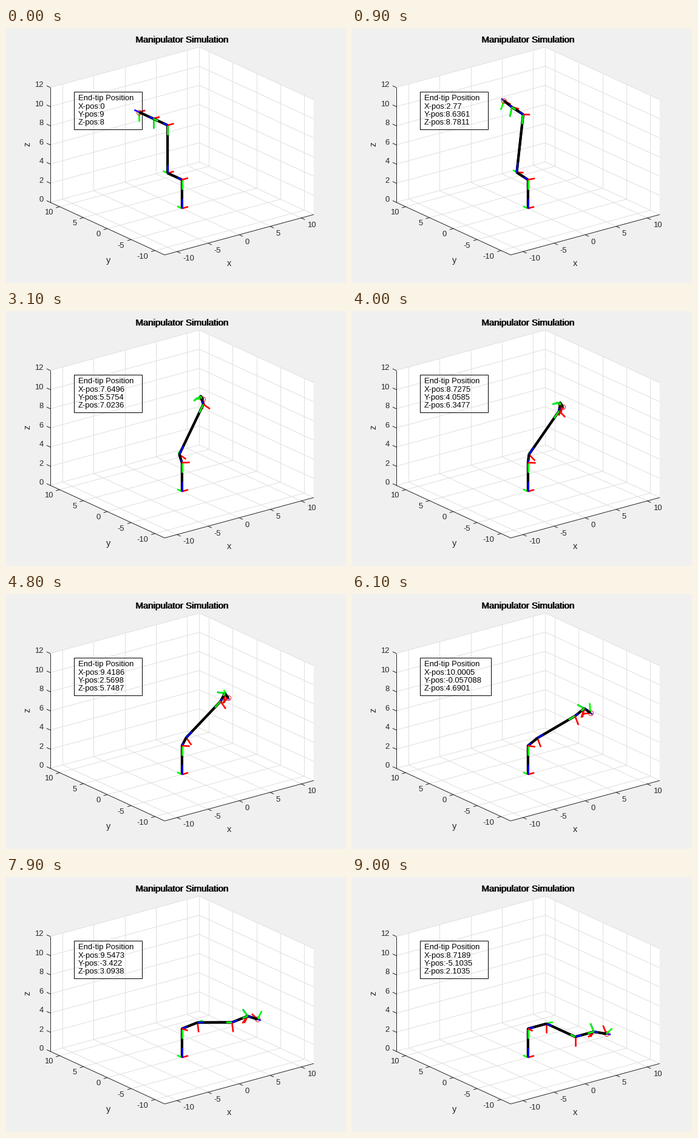
Recreate the animation shown at these times as a matplotlib script. Size 560 px wide and 420 px high, loop 9.1 s.

```python
import numpy as np
import matplotlib.pyplot as plt
from matplotlib.animation import FuncAnimation
from matplotlib.patches import Polygon, Rectangle

W, H, DPI = 560, 420, 100
FRAMES, INTERVAL = 91, 100
LIM, TOP = 12, 12
INK, GRID = "#262626", "#dfdfdf"

# Orthographic view: pixel steps per unit of x, y and z
ORIGIN = np.array([289.8, 297.2])
STEP = np.array([[10.233, -2.771], [-7.85, -3.61], [0, -15.77]])

# Nearness to the viewer (azimuth -37.5, elevation 30)
NEAR = np.array([-0.527 / 24, -0.687 / 24, 0.5 / 12])
BIAS = 0.005  # coloured axes win over the link they lie on

PIECES = (3, 3, 6, 3, 0, 3)  # unit pieces per link, for depth order


def px(points):
    return ORIGIN + np.asarray(points, float) @ STEP


def pt(pixels):
    return pixels * 72 / DPI


plt.rcParams["font.family"] = "Liberation Sans"
fig = plt.figure(figsize=(W / DPI, H / DPI), dpi=DPI, facecolor="#f0f0f0")
ax = fig.add_axes([0, 0, 1, 1])
ax.set_xlim(0, W)
ax.set_ylim(H, 0)
ax.axis("off")


def stroke(color, width):
    return ax.plot([], [], color=color, lw=pt(width),
                   solid_capstyle="butt", solid_joinstyle="round")[0]


def segment(a, b, color, z=1):
    p = px([a, b])
    ax.plot(p[:, 0], p[:, 1], color=color, lw=pt(1), zorder=z,
            solid_capstyle="butt")


def label(x, y, s, size=13, ha="center", color=INK, **kw):
    return ax.text(x, y, s, fontsize=pt(size), ha=ha, va="baseline",
                   color=color, zorder=10, **kw)


def tick(point, outward, dx, dy, value, ha):
    p = px(point)
    d = np.array(outward) @ STEP
    q = p + 6 * d / np.hypot(*d)
    ax.plot([p[0], q[0]], [p[1], q[1]], color=INK, lw=pt(1), zorder=2)
    label(p[0] + dx, p[1] + dy, str(value), ha=ha)


def draw_scene():
    lo, hi = -LIM, LIM
    walls = ([(lo, lo, 0), (hi, lo, 0), (hi, hi, 0), (lo, hi, 0)],
             [(lo, hi, 0), (hi, hi, 0), (hi, hi, TOP), (lo, hi, TOP)],
             [(hi, lo, 0), (hi, hi, 0), (hi, hi, TOP), (hi, lo, TOP)])
    for wall in walls:
        ax.add_patch(Polygon(px(wall), fc="white", ec="white", lw=0.3))

    for v in range(-10, 11, 5):
        segment((v, lo, 0), (v, hi, 0), GRID)
        segment((v, hi, 0), (v, hi, TOP), GRID)
        segment((lo, v, 0), (hi, v, 0), GRID)
        segment((hi, v, 0), (hi, v, TOP), GRID)
        tick((v, lo, 0), (0, -1, 0), 9.5, 15.2, v, "left")
        tick((lo, v, 0), (-1, 0, 0), -11.2, 13, v, "right")
    for v in range(0, TOP + 1, 2):
        segment((lo, hi, v), (hi, hi, v), GRID)
        segment((hi, hi, v), (hi, lo, v), GRID)
        tick((lo, hi, v), (0, 1, 0), -11, -0.8, v, "right")
    segment((hi, hi, 0), (hi, hi, TOP), GRID)

    segment((lo, lo, 0), (hi, lo, 0), INK, z=2)
    segment((lo, lo, 0), (lo, hi, 0), INK, z=2)
    segment((lo, hi, 0), (lo, hi, TOP), INK, z=2)

    label(367.5, 392, "x", 14.67)
    label(169, 387, "y", 14.67)
    label(35.5, 192, "z", 14.67, rotation=90)
    for shift in (-0.4, 0.4):
        label(290.3 + shift, 24.2, "Manipulator Simulation", 15,
              color="black")


def dh(theta, d, alpha):
    """Link transform with zero link length; angles in degrees."""
    t, a = np.radians([theta, alpha])
    ct, st, ca, sa = np.cos(t), np.sin(t), np.cos(a), np.sin(a)
    return np.array([[ct, -st * ca, st * sa, 0],
                     [st, ct * ca, -ct * sa, 0],
                     [0, sa, ca, d],
                     [0, 0, 0, 1]])


def poses(k):
    """Base frame and the six joint frames after k steps."""
    links = [(-k, 3, -90),
             (k, 3, 90),
             (0, min(5 + k, 6), -90),
             (min(k, 45), 3, -90),
             (min(k, 25), 0, 90),
             (k, 3, 0)]
    out = [np.eye(4)]
    for link in links:
        out.append(out[-1] @ dh(*link))
    return out


def number(v):
    v = round(float(v), 9) + 0.0
    digits = 5 if abs(v) < 10 else 6
    return f"{v:.{digits}g}"


def place(line, a, b, bias=0.0):
    """Put a 3D segment on screen, ordered by its depth."""
    p = px([a, b])
    line.set_data(p[:, 0], p[:, 1])
    line.set_zorder(5 + (a + b) / 2 @ NEAR + bias)


draw_scene()
arm = stroke("black", 4)
arm.set_zorder(3)
pieces = [[stroke("black", 4) for _ in range(n)] for n in PIECES]
triads = [[stroke(c, 2.67) for c in ("#ff0000", "#00ff00", "#0000ff")]
          for _ in range(7)]
tip, = ax.plot([], [], "o", mfc="none", mec="red", ms=pt(8), mew=pt(0.9))
box = Rectangle((112.5, 105.5), 112, 62, fc="none", ec="black", lw=pt(1),
                zorder=9, snap=False)
ax.add_patch(box)
label(119, 119.3, "End-tip Position", ha="left", color="black")
readout = [label(119, 132.7 + 13.3 * i, "", ha="left", color="black")
           for i in range(3)]


def update(k):
    frames = poses(k)
    joints = [f[:3, 3] for f in frames]
    arm.set_data(*px(joints).T)
    for a, b, lines in zip(joints, joints[1:], pieces):
        cuts = np.linspace(a, b, len(lines) + 1)
        for line, p, q in zip(lines, cuts, cuts[1:]):
            place(line, p, q)
    for f, start, lines in zip(frames, joints, triads):
        for axis, line in enumerate(lines):
            place(line, start, start + f[:3, axis], BIAS)
    end = joints[-1]
    tip.set_data(*px([end]).T)
    tip.set_zorder(5 + end @ NEAR + BIAS)

    texts = [f"{n}-pos:{number(v)}" for n, v in zip("XYZ", end)]
    for item, s in zip(readout, texts):
        item.set_text(s)
    # The box grows only for an entry longer than its heading
    box.set_width(117 if max(map(len, texts)) > 14 else 112)
    return []


anim = FuncAnimation(fig, update, frames=FRAMES, interval=INTERVAL,
                     repeat=True, repeat_delay=0, blit=False)
plt.show()
```
